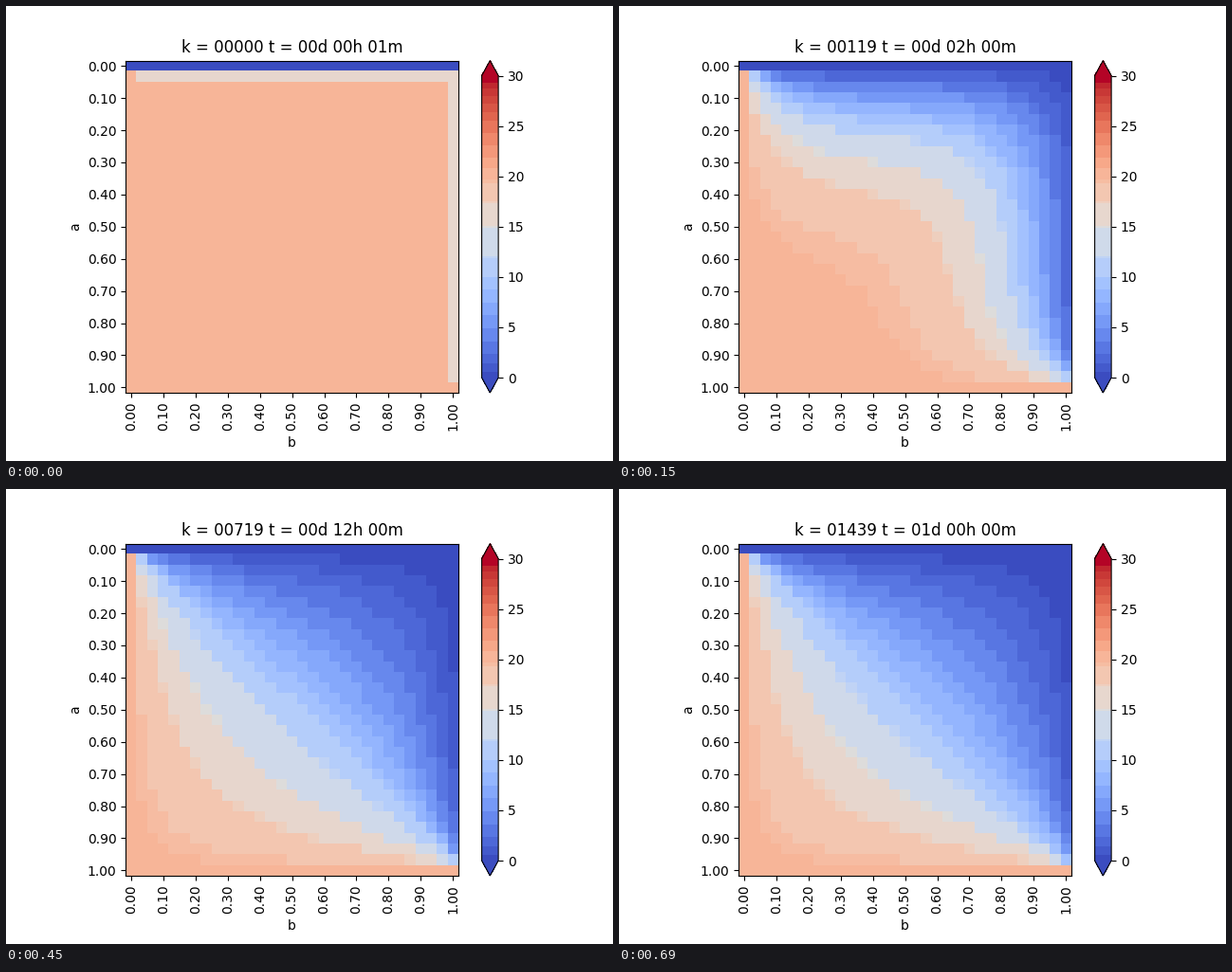
Recreate the animation shown at these times as a matplotlib script. Size 640 by 480 pixels, loop 750 ms.

```python
import numpy as np
import matplotlib
import matplotlib.pyplot as plt
from matplotlib.animation import FuncAnimation
from matplotlib.colors import ListedColormap

N = 30                 # cells per side
HOT, COLD, TOP = 20.0, 0.0, 30.0
RATE = 0.1275          # diffusion number of one half-minute step
STEPS = [0, 119, 359, 719, 1439]
BANDS = [0, 0.6, 1.4, 2.4, 3.6, 4.9, 6.2, 7.45, 8.75, 10, 11.9, 12.1, 14.9,
         15.1, 17.3, 17.5, 19.3, 19.7, 20.8, 21.9, 23.1, 24.3, 25.5, 26.4,
         27.2, 28, 28.7, 29.3, 30]


def banded_coolwarm(n=600):
    """Coolwarm reduced to flat bands, one colour for each."""
    base = matplotlib.colormaps["coolwarm"]
    values = (np.arange(n) + 0.5) / n * TOP
    edges = np.array(BANDS)
    mids = (edges[:-1] + edges[1:]) / 2
    mids[0], mids[-1] = 0, TOP
    band = np.searchsorted(edges, values) - 1
    return ListedColormap(base(mids[band] / TOP))


def first_minute():
    # The last column is a cold wall outside the view.
    T = np.full((N + 1, N + 2), HOT)
    T[1, 1:] = T[1:-1, N] = 16
    T[0] = COLD
    T[:-1, -1] = COLD
    return T


def diffuse(T):
    mid = T[1:-1, 1:-1]
    around = T[:-2, 1:-1] + T[2:, 1:-1] + T[1:-1, :-2] + T[1:-1, 2:]
    mid += RATE * (around - 4 * mid)


def solve():
    T = first_minute()
    fields = []
    for k in range(STEPS[-1] + 1):
        if k:
            diffuse(T)
            diffuse(T)
        if k in STEPS:
            fields.append(T[:, :-1].copy())
    return fields


def caption(k):
    hours, minutes = divmod(k + 1, 60)
    days, hours = divmod(hours, 24)
    return f"k = {k:05d} t = {days:02d}d {hours:02d}h {minutes:02d}m"


fields = solve()

fig, ax = plt.subplots(figsize=(6.4, 4.8), dpi=100)
fig.subplots_adjust(bottom=0.15)
image = ax.imshow(fields[0], cmap=banded_coolwarm(), vmin=0, vmax=TOP,
                  interpolation="nearest")
fig.colorbar(image, ax=ax, extend="both", ticks=range(0, 31, 5))

ticks = np.arange(0, N + 1, 3)
labels = [f"{t / N:.2f}" for t in ticks]
ax.set_xticks(ticks, labels, rotation=90)
ax.set_yticks(ticks, labels)
ax.set_xlabel("b")
ax.set_ylabel("a")
title = ax.set_title(caption(0))


def update(i):
    image.set_data(fields[i])
    title.set_text(caption(STEPS[i]))
    return image, title


anim = FuncAnimation(fig, update, frames=len(STEPS), interval=150,
                     repeat=True, repeat_delay=0, blit=False)
plt.show()
```
